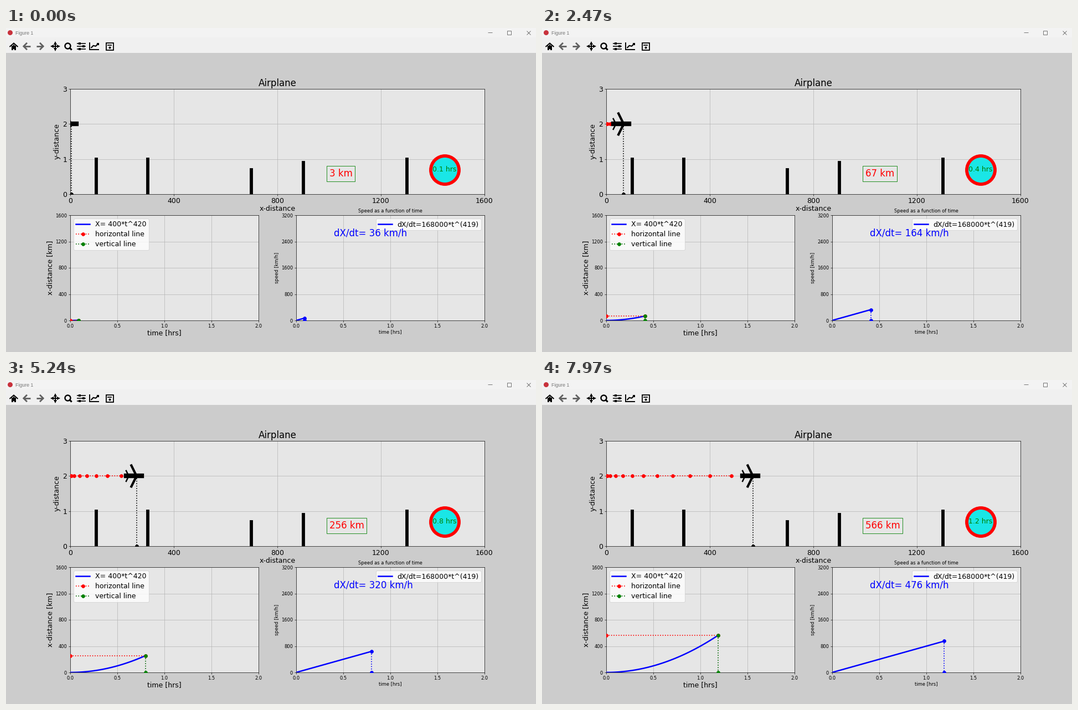
Recreate the animation shown at these times as a matplotlib script. Size 957x585 px, loop 8 s.

```python
import numpy as np
import matplotlib.pyplot as plt
from matplotlib.animation import FuncAnimation
from matplotlib.patches import Rectangle

W, H, DPI = 957, 585, 60
FRAMES, INTERVAL = 125, 64
PT = 72 / DPI  # points per pixel
PANEL = (0.9, 0.9, 0.9)
GREEN, GRAY = "#008000", "#777777"

plt.rcParams["font.family"] = "DejaVu Sans"
plt.rcParams["toolbar"] = "None"
plt.rcParams["lines.markersize"] = 7
fig = plt.figure(figsize=(W / DPI, H / DPI), dpi=DPI, facecolor=(0.8, 0.8, 0.8))

# ---------- window frame, in pixels ----------
ui = fig.add_axes([0, 0, 1, 1], zorder=-1)
ui.set_xlim(0, W)
ui.set_ylim(H, 0)
ui.axis("off")


def stroke(x, y, width, color="black"):
    x, y = np.broadcast_arrays(x, y)
    ui.plot(x, y, color=color, lw=width * PT, solid_capstyle="butt",
            solid_joinstyle="miter")


def mark(x, y, kind, size, color="black", fill=None, edge=0.0):
    ui.plot([x], [y], kind, ms=size * PT, mec=color, mfc=fill or color,
            mew=edge * PT)


def title_bar():
    ui.add_patch(Rectangle((0, 0), W, 17, color="#f3f3f3", lw=0))
    ui.add_patch(Rectangle((0, 17), W, 27.5, color="#f0f0f0", lw=0))
    mark(7, 7.5, "o", 9, "#c8323c")
    ui.text(17, 11.5, "Figure 1", color=GRAY, fontsize=8.8 * PT,
            family="Liberation Sans")
    stroke([870, 878], 8, 1, GRAY)
    mark(908, 7.5, "s", 7, GRAY, "none", 1)
    mark(942.5, 7.5, "x", 7, GRAY, edge=1)


def toolbar():
    mid = 33
    span = np.array([-1, 0, 1])

    # home
    stroke(14 + 7.5 * span, 27.5 + 6.5 * abs(span), 2)
    mark(14, 31.5, "^", 7)
    mark(14, 36, "s", 9)
    mark(14, 38.5, "s", 3, "#f0f0f0")

    # back and forward
    for x, side in ((38, -1), (61, 1)):
        stroke(x + 6 * side * span, mid, 2.8, "#606060")
        stroke(x + side * (6.2 - 6.2 * abs(span)), mid + 6.2 * span, 2.8, "#606060")

    # pan
    stroke(89 + 6 * span, mid, 2)
    stroke(89, mid + 6 * span, 2)
    for kind, dx, dy in ((">", 1, 0), ("<", -1, 0), ("v", 0, 1), ("^", 0, -1)):
        mark(89 + 6.3 * dx, mid + 6.3 * dy, kind, 5.5)

    # zoom
    mark(110.7, 31.5, "o", 10, fill="none", edge=2.4)
    stroke(116.5 + 2.2 * span, 37.4 + 2.2 * span, 3)

    # sliders
    for k in range(3):
        y = 28 + 5.2 * k
        stroke(135.8 + 7.8 * span, y, 1.6)
        mark(133 + 6.5 * (k % 2), y, "s", 4)

    # chart
    stroke([151.2, 151.2, 168], [26, 39.4, 39.4], 1.9)
    k = np.arange(4)
    stroke(153.5 + 4.2 * k, 36 - 1.6 * k - 2.6 * (k % 2), 2.1)
    mark(165.5, 28.8, "s", 3.5)

    # save
    mark(187, mid, "s", 13, fill="none", edge=1.8)
    stroke(187 + 4 * span, 31, 1.7)
    mark(187, 35.4, "o", 4)


title_bar()
toolbar()

# ---------- charts ----------
grid = fig.add_gridspec(2, 2, left=116 / W, right=864 / W, top=1 - 110 / H,
                        bottom=1 - 528 / H, hspace=0.2, wspace=0.2)


def chart(cell, xticks, yticks, tick_size, label_size, xlabel, ylabel):
    ax = fig.add_subplot(cell, facecolor=PANEL)
    ax.set_xlim(xticks[0], xticks[-1])
    ax.set_ylim(yticks[0], yticks[-1])
    ax.set_xticks(xticks)
    ax.set_yticks(yticks)
    ax.tick_params(labelsize=tick_size)
    ax.set_xlabel(xlabel, fontsize=label_size, labelpad=1.5)
    ax.set_ylabel(ylabel, fontsize=label_size)
    ax.grid(True)
    return ax


hours = np.arange(0, 2.1, 0.5)
km = range(0, 1601, 400)
sky = chart(grid[0, :], km, range(4), 15, 15, "x-distance", "y-distance")
way = chart(grid[1, 0], hours, km, 10, 15, "time [hrs]", "x-distance [km]")
vel = chart(grid[1, 1], hours, range(0, 3201, 800), 10, 10,
            "time [hrs]", "speed [km/h]")
sky.set_title("Airplane", fontsize=20)
vel.set_title("Speed as a function of time", fontsize=10)

for x, top in ((100, 1), (300, 1), (700, 0.7), (900, 0.9), (1300, 1)):
    sky.plot([x, x], [0, top], "k", lw=7)


def moving(ax, style, width, z=4, **kw):
    return ax.plot([], [], style, lw=width, zorder=z, **kw)[0]


trail = moving(sky, "r:o", 2)
drop = moving(sky, "k:o", 2)
body = moving(sky, "k", 10, 5)
wings = moving(sky, "k", 5, 5)
tail = moving(sky, "k", 3, 5)

sky.plot([1446.6], [0.7], "o", ms=51 * PT, mfc=(0.1, 0.9, 0.9), mec="red", mew=7)
clock = sky.text(1400, 0.65, "", color=GREEN, fontsize=15, zorder=6)
meter = sky.text(1000, 0.5, "", color="red", fontsize=20, zorder=6,
                 bbox=dict(facecolor=PANEL, edgecolor=GREEN, pad=6))

curve = moving(way, "b", 3, label="X= 400*t^420")
level = moving(way, "r:o", 2, label="horizontal line")
plumb = moving(way, ":o", 2, label="vertical line", color="darkgreen",
               mfc=GREEN, mec=GREEN)
ramp = moving(vel, "b", 3, label="dX/dt=168000*t^(419)")
foot = moving(vel, "b:o", 2)
speed = vel.text(0.4, 2570, "", color="blue", fontsize=20, zorder=6)

for ax, color, corner in ((way, GREEN, "upper left"), (vel, "blue", "upper right")):
    ax.plot([0, 1.5], [0, 0], color=color, lw=0.8, zorder=3.5)
    ax.legend(loc=corner, fontsize=15, labelspacing=0.4, borderpad=0.32)


# ---------- motion ----------
def flight_time(i):
    """Slightly uneven clock that ticks in steps of 0.005 h."""
    t = np.interp(i, [0, 36, 53, 98, 124], [0.088, 0.388, 0.56, 0.942, 1.19])
    return round(t * 200) / 200


def chevron(line, x, length, half):
    line.set_data([x - length, x, x - length], [2 + half, 2, 2 - half])


def update(i):
    t = flight_time(i)
    x = 400 * t**2

    marks = 0.1 * np.arange(int(t * 10 + 1e-6) + 1)
    trail.set_data(400 * marks**2, np.full(len(marks), 2))
    drop.set_data([x, x], [2, 0])
    body.set_data([x - 40, x + 20], [2, 2])
    chevron(wings, x, 20, 0.3)
    chevron(tail, x - 30, 10, 0.15)
    clock.set_text(f"{t:.1f} hrs")
    meter.set_text(f"{x:.0f} km")

    ts = np.linspace(0, t, 120)
    curve.set_data(ts, 400 * ts**2)
    level.set_data([0, t], [x, x])
    plumb.set_data([t, t], [x, 0])

    ramp.set_data([0, t], [0, 800 * t])
    foot.set_data([t, t], [800 * t, 0])
    speed.set_text(f"dX/dt= {400 * t:.0f} km/h")
    return []


anim = FuncAnimation(fig, update, frames=FRAMES, interval=INTERVAL,
                     init_func=lambda: update(0), repeat=True, repeat_delay=0)
plt.show()
```
